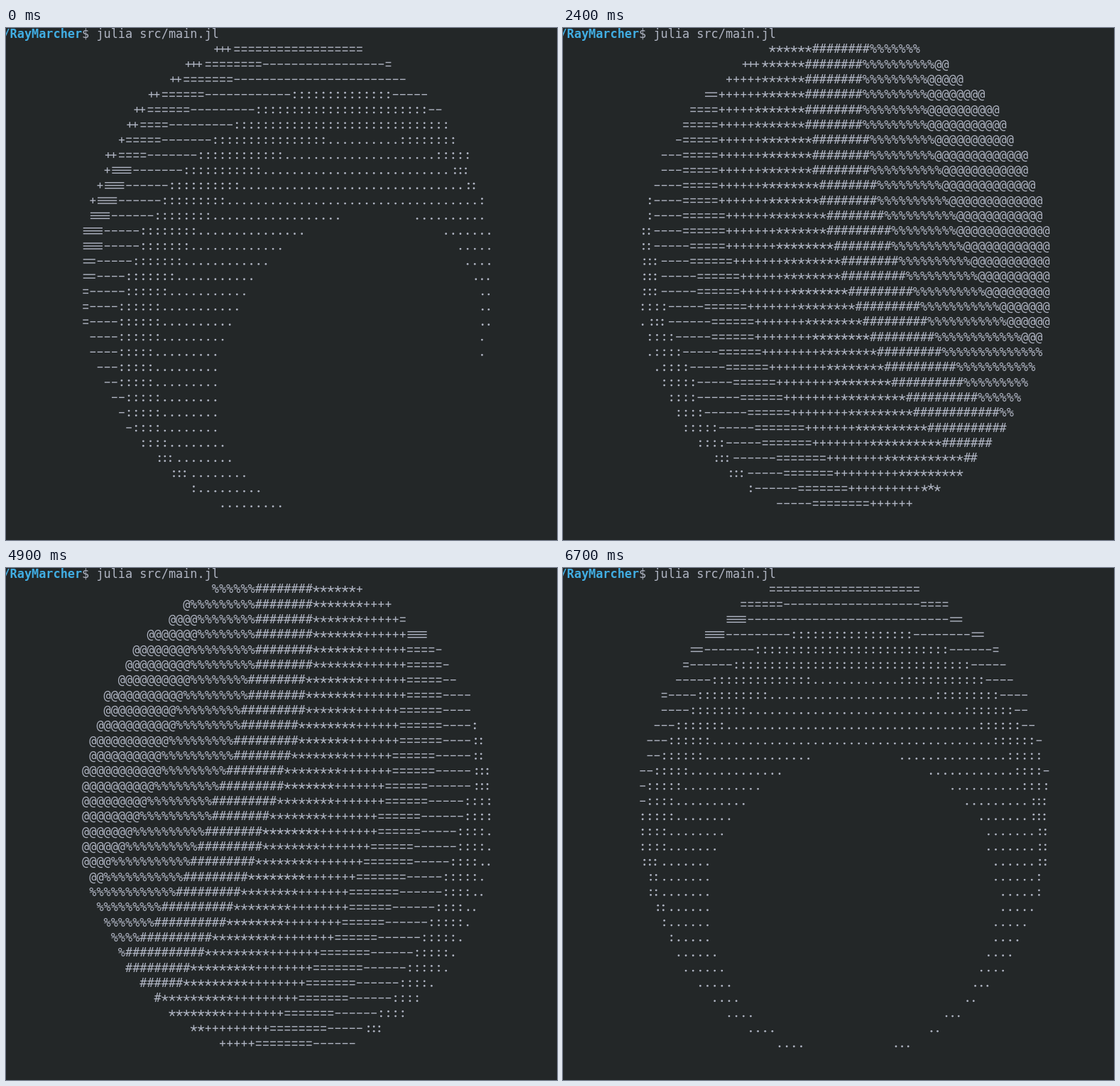
An HTML page with a canvas that plays this animation: 776 by 721 pixels, repeating every 6.8 s.

```html
<!DOCTYPE html>
<html lang="en">
<head>
<meta charset="utf-8">
<title>Ray marcher</title>
<style>
  html, body { margin: 0; width: 100%; height: 100%; overflow: hidden; background: #232728; }
  canvas { display: block; }
</style>
</head>
<body>
<canvas id="stage" width="776" height="721"></canvas>
<script>
const ctx = document.getElementById('stage').getContext('2d');
const FONT = '16.86px "DejaVu Sans Mono", monospace';
const BG = '#232728', FG = '#b0b5c3', BLUE = '#41ade2';
const CELL = 10.15, LINE = 21.33, LEFT = 107.1, BASE = 35.3;
const COLS = 57, ROWS = 31;
const RAMP = ' .:-=+*#%@';
const LOOP = 6800;

// Ticks of 100 ms at which the previous picture stays on screen.
const HELD = new Set([25, 26, 27, 28, 30, 32, 34, 36, 38, 40, 42, 44, 48, 50, 53, 55]);

// Azimuth of the light: [tick, degrees], 0 is towards the viewer.
const AZIMUTH = [[0, 202.1], [15, 114.8], [24, 64.2], [35, 6.4], [43, -33.3], [54, -97.5], [67, -177.2]];

// Longest run that is drawn tightly, and the spacing inside it.
const TIGHT = { '+': [3, 7.7], '#': [4, 9.2], ':': [3, 7.6], '.': [3, 8.6] };

const rad = deg => deg * Math.PI / 180;

// Surface normal of the sphere seen in perspective, or null outside it.
// Grazing rays run out of steps, so the visible disc is a little too small.
const CAMERA = 7;
const VISIBLE = 0.955;
const SPREAD = VISIBLE / Math.sqrt(CAMERA * CAMERA - 1);
function normalAt(col, row) {
  const x = (col - 28) / 28.84, y = (14.95 - row) / 16;
  const r = Math.hypot(x, y);
  if (r > 1) return null;
  const ray = Math.atan(r * SPREAD);
  const tilt = Math.asin(CAMERA * Math.sin(ray)) - ray;
  const k = r ? Math.sin(tilt) / r : 0;
  return [x * k, y * k, Math.cos(tilt)];
}
const normals = Array.from({ length: ROWS }, (_, row) =>
  Array.from({ length: COLS }, (_, col) => normalAt(col, row)));

function azimuthAt(tick) {
  const i = Math.max(1, AZIMUTH.findIndex(([t]) => t >= tick));
  const [t0, a0] = AZIMUTH[i - 1], [t1, a1] = AZIMUTH[i];
  return rad(a0 + (a1 - a0) * (tick - t0) / (t1 - t0));
}

function lightAt(tick) {
  const a = azimuthAt(tick);
  const e = rad(21.9 - 1.9 * Math.cos(a));
  return [Math.cos(e) * Math.sin(a), Math.sin(e), Math.cos(e) * Math.cos(a)];
}

function shade(n, light) {
  if (!n) return ' ';
  const dot = n[0] * light[0] + n[1] * light[1] + n[2] * light[2];
  return RAMP[Math.max(0, Math.min(9, Math.floor((0.5 + 0.5 * dot) * 10)))];
}

function line(x1, y1, x2, y2) {
  ctx.beginPath();
  ctx.moveTo(x1, y1);
  ctx.lineTo(x2, y2);
  ctx.stroke();
}

function dot(x, y) {
  ctx.beginPath();
  ctx.arc(x, y, 1.4, 0, 7);
  ctx.fill();
}

function bars(x1, x2, y, offsets) {
  offsets.forEach(d => line(x1, y + d, x2, y + d));
}

function glyph(ch, x, base) {
  const y = base - 5.6;
  switch (ch) {
    case '.': dot(x, base - 1.5); break;
    case ':': dot(x, base - 1.5); dot(x, base - 8.1); break;
    case '-': bars(x - 3.8, x + 3.8, y, [0]); break;
    case '=': bars(x - 3.9, x + 3.9, y, [-2.5, 2.5]); break;
    case '+':
      line(x - 4, y, x + 4, y);
      line(x, y - 4, x, y + 4);
      break;
    case '*':
      for (let i = 0; i < 5; i++) {
        const a = rad(72 * i - 90);
        line(x, y, x + 4.7 * Math.cos(a), y + 4.7 * Math.sin(a));
      }
      break;
    default: ctx.fillText(ch, x - CELL / 2, base);
  }
}

function drawRun(ch, start, count, base) {
  if (ch === '=' && (count === 2 || count === 3)) {
    const x = LEFT + start * CELL;
    bars(x + 1.6, x + count * CELL - 1.6, base - 5.6, count === 2 ? [-2.5, 2.5] : [-4, 0, 4]);
    return;
  }
  const stars = ch === '*' && count === 3;
  const rule = TIGHT[ch];
  const step = stars ? 9 : rule && count <= rule[0] ? rule[1] : CELL;
  const middle = LEFT + (start + count / 2) * CELL;
  for (let i = 0; i < count; i++) {
    const lift = stars && i === 1 ? 2 : 0;
    glyph(ch, middle + (i - (count - 1) / 2) * step, base - lift);
  }
}

function drawPrompt() {
  const y = BASE - LINE;
  ctx.font = 'bold ' + FONT;
  ctx.fillStyle = BLUE;
  ctx.fillText('/RayMarcher', LEFT - 11 * CELL, y);
  ctx.font = FONT;
  ctx.fillStyle = FG;
  ctx.fillText('$ julia src/main.jl', LEFT, y);
}

function draw(tick) {
  ctx.fillStyle = BG;
  ctx.fillRect(0, 0, 776, 721);
  drawPrompt();
  ctx.strokeStyle = FG;
  ctx.lineWidth = 1.4;
  const light = lightAt(tick);
  normals.forEach((cells, row) => {
    const text = cells.map(n => shade(n, light)).join('');
    for (const run of text.matchAll(/([^ ])\1*/g)) {
      drawRun(run[1], run.index, run[0].length, BASE + row * LINE);
    }
  });
}

let shown = -1;
const begin = performance.now();
function frame() {
  let tick = Math.floor((performance.now() - begin) % LOOP / 100);
  while (HELD.has(tick)) tick--;
  if (tick !== shown) draw(shown = tick);
  requestAnimationFrame(frame);
}
frame();
</script>
</body>
</html>
```
